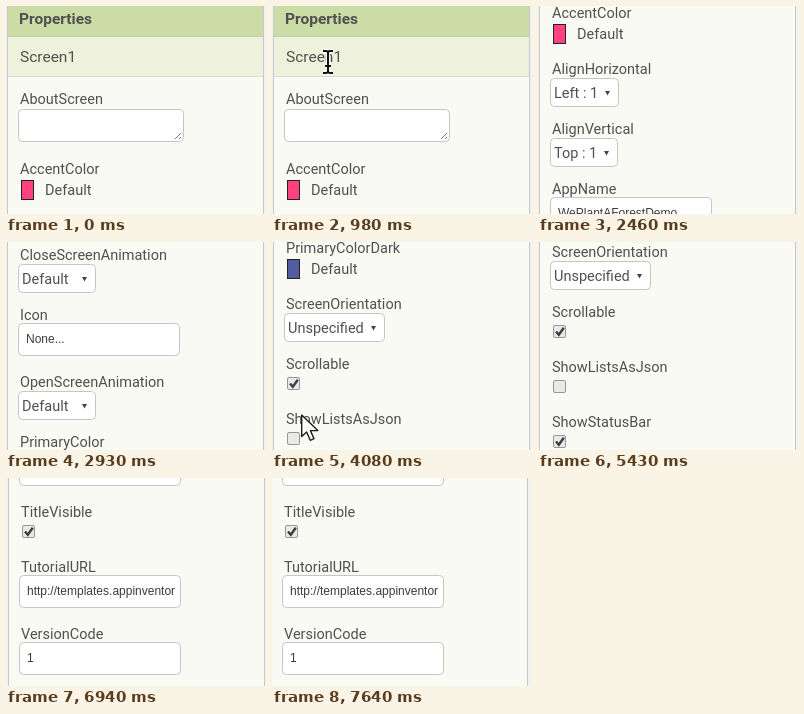
Recreate the animation shown at these times as an HTML page. Size 260x208 px, loop 8000 ms.

```html
<!DOCTYPE html>
<html lang="en">
<head>
<meta charset="utf-8">
<title>Properties panel</title>
<style>
  html, body { margin: 0; width: 260px; height: 208px; overflow: hidden; background: #f1f1f1; }
  svg { display: block; }
  text { font: 14.5px Roboto, sans-serif; fill: #505050; white-space: pre; }
  .head { font-size: 15.5px; font-weight: 700; }
  .name { font-size: 15.5px; }
  .value { font: 12px "Liberation Sans", Arial, sans-serif; fill: #3c3c3c; }
  .box { fill: #fff; stroke: #c6c6c6; }
</style>
</head>
<body>
<svg id="stage" width="260" height="208" viewBox="0 0 260 208"></svg>
<script>
const LOOP = 8000;
const TICK = 75;
const stage = document.getElementById('stage');

function add(parent, tag, attrs, text) {
  const el = document.createElementNS('http://www.w3.org/2000/svg', tag);
  for (const key in attrs) el.setAttribute(key, attrs[key]);
  if (text) el.textContent = text;
  parent.append(el);
  return el;
}

const panel = add(stage, 'g', {});
const list = add(panel, 'g', {});

const rect = (x, y, width, height, fill) => add(list, 'rect', { x, y, width, height, fill });
const path = (d, attrs) => add(list, 'path', { d, ...attrs });
const label = (x, y, text, cls = '') => add(list, 'text', { x, y, class: cls }, text);
const box = (y, width, height) =>
  add(list, 'rect', { x: 12.5, y: y + .5, width: width - 1, height: height - 1, rx: 4, class: 'box' });

// Each control draws below a label centred at y and returns the row height.
const controls = {
  area(y) {
    box(y + 11, 166, 33);
    path(`M169 ${y + 41}l6-6M173 ${y + 41}l2-2`, { stroke: '#777', fill: 'none' });
    return 70;
  },
  color(y, fill) {
    add(list, 'rect', { x: 15.5, y: y + 12.5, width: 12, height: 19, fill, stroke: '#222' });
    label(39, y + 27, 'Default');
    return 56;
  },
  select(y, text, width) {
    box(y + 10, width, 29);
    label(16, y + 30, text);
    path(`M${width - 2} ${y + 23}h5l-2.5 4.5z`, { fill: '#444' });
    return 60;
  },
  input(y, text) {
    box(y + 9, 162, 33);
    label(20, y + 29, text, 'value');
    return 67;
  },
  check(y, on) {
    add(list, 'rect', { x: 15.5, y: y + 14.5, width: 12, height: 12, rx: 1.5, fill: '#e9e9e9', stroke: '#969696' });
    if (on) path(`M18 ${y + 20.5}l2.8 3.2l5-7`, { fill: 'none', stroke: '#3d3d3d', 'stroke-width': 2.4 });
    return 55;
  }
};

const rows = [
  ['AboutScreen', 'area'],
  ['AccentColor', 'color', '#ff4081'],
  ['AlignHorizontal', 'select', 'Left : 1', 69],
  ['AlignVertical', 'select', 'Top : 1', 68],
  ['AppName', 'input', 'WePlantAForestDemo'],
  ['BackgroundColor', 'color', '#ffffff'],
  ['BackgroundImage', 'input', 'None...'],
  ['CloseScreenAnimation', 'select', 'Default', 78],
  ['Icon', 'input', 'None...'],
  ['OpenScreenAnimation', 'select', 'Default', 78],
  ['PrimaryColor', 'color', '#3f51b5'],
  ['PrimaryColorDark', 'color', '#525c9e'],
  ['ScreenOrientation', 'select', 'Unspecified', 101],
  ['Scrollable', 'check', true],
  ['ShowListsAsJson', 'check', false],
  ['ShowStatusBar', 'check', true],
  ['Sizing', 'select', 'Responsive', 101],
  ['Theme', 'select', 'Classic', 78],
  ['Title', 'input', 'Screen1'],
  ['TitleVisible', 'check', true],
  ['TutorialURL', 'input', 'http://templates.appinventor'],
  ['VersionCode', 'input', '1'],
  ['VersionName', 'input', '1.0']
];

rect(2, 0, 255, 1600, '#f9faf4');
rect(2, 0, 255, 30, '#cbdca6');
rect(2, 30, 255, 1, '#c3cdaa');
rect(2, 31, 255, 39, '#eef2dd');
rect(2, 70, 255, 1, '#d8dbcf');
label(13, 18, 'Properties', 'head');
label(14, 56, 'Screen1', 'name');

let rowY = 92;
for (const [title, kind, ...args] of rows) {
  label(14, rowY + 6, title);
  rowY += controls[kind](rowY, ...args);
}

for (const x of [1, 257]) add(panel, 'rect', { x, y: 0, width: 1, height: 208, fill: '#c8c8c8' });

const arrow = add(stage, 'path', {
  d: 'M.7 1V22.5L5.6 18L9.3 26.3L13 24.6L9.4 16.6H16.8Z',
  fill: '#fff', stroke: '#1c1c1c', 'stroke-width': 1.4, 'stroke-linejoin': 'round'
});
const beam = add(stage, 'g', {});
const beamLine = 'M-5-11H-2Q0-11 0-9Q0-11 2-11H5M0-9V9M-5 11H-2Q0 11 0 9Q0 11 2 11H5M-3 4H3';
add(beam, 'path', { d: beamLine, fill: 'none', stroke: '#fff', 'stroke-width': 4 });
add(beam, 'path', { d: beamLine, fill: 'none', stroke: '#111', 'stroke-width': 2 });

// Glides: start time, number of ticks, end x, end y.
const scrolling = [
  [2380, 3, 0, 234], [2780, 4, 0, 610], [3240, 1, 0, 766],
  [5250, 1, 0, 790], [5430, 3, 1, 874], [5710, 4, 3, 1160],
  [6170, 1, 4, 1205], [6245, 3, 2, 1206], [6940, 3, 0, 1206], [7490, 3, -2, 1206]
];
const pointing = [
  [0, 1, 183, 195], [300, 8, 27, 58], [905, 2, 56, 56], [1055, 4, 75, 54], [1530, 4, 237, 65],
  [3000, 1, 36, 196], [4080, 5, 2, 78], [4460, 3, 10, 36], [4850, 1, 17, 31]
];

// Moves evenly along the glides, one position per tick.
function follow(glides, t) {
  let x = 0, y = 0;
  for (const [start, ticks, endX, endY] of glides) {
    if (t < start) break;
    const part = Math.min(1, (Math.floor((t - start) / TICK) + 1) / ticks);
    x += (endX - x) * part;
    y += (endY - y) * part;
  }
  return [Math.round(x), Math.round(y)];
}

const within = (t, from, to) => t >= from && t < to;
const move = (el, x, y) => el.setAttribute('transform', `translate(${x} ${y})`);

function draw() {
  const t = performance.now() % LOOP;
  const [shift, offset] = follow(scrolling, t);
  move(panel, shift, 0);
  move(list, 0, -offset);

  const visible = within(t, 300, 1830) || within(t, 4080, 5250);
  const overText = within(t, 905, 1205);
  for (const el of [arrow, beam]) {
    move(el, ...follow(pointing, t));
    el.style.display = visible && overText === (el === beam) ? '' : 'none';
  }
  requestAnimationFrame(draw);
}
draw();
</script>
</body>
</html>
```
